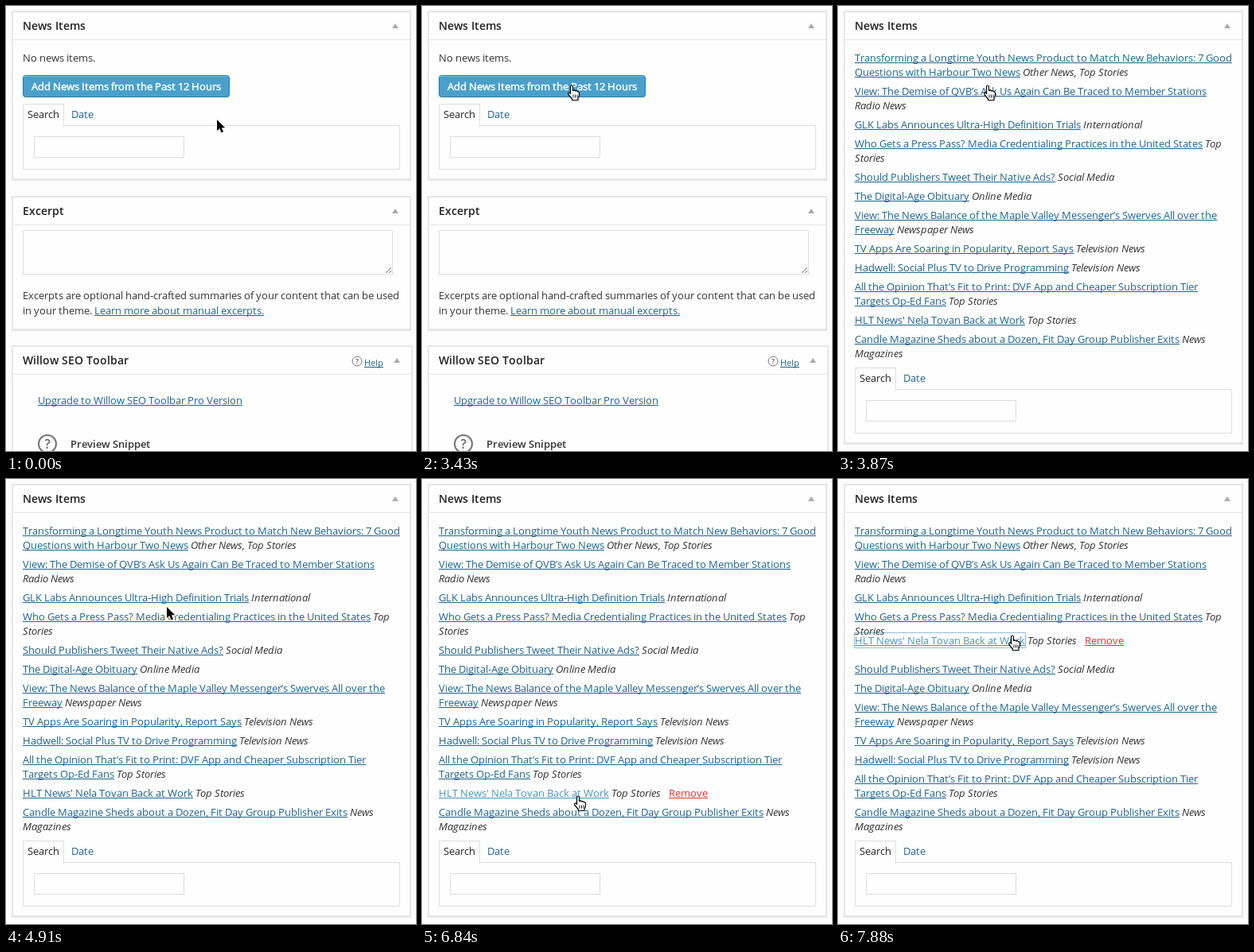
An HTML page for the animation above (8000 ms loop, 515 by 560 pixels).

```html
<!DOCTYPE html>
<html lang="en">
<head>
<meta charset="utf-8">
<title>News Items</title>
<style>
html, body { margin: 0; width: 515px; height: 560px; overflow: hidden; background: #fcfcfc; }
svg { display: block; }
</style>
</head>
<body>
<svg id="stage" width="515" height="560" viewBox="0 0 515 560"></svg>
<script>
const LOOP = 8000, LEFT = 21, ROW = 18, GAP = 6;
const FAMILY = "'Open Sans', sans-serif";
const REGULAR = `13px ${FAMILY}`, ITALIC = `italic 13px ${FAMILY}`;
const TITLE = `600 14px ${FAMILY}`, STRONG = `600 13px ${FAMILY}`, SMALL = `11px ${FAMILY}`;
const INK = '#333', DARK = '#222', BLUE = '#1d6590', HOT = '#4a96bf', RED = '#ea3328', LINE = '#dedede';

// "|" ends the link part, the rest is the category
const items = [
  'Transforming a Longtime Youth News Product to Match New Behaviors: 7 Good\nQuestions with Harbour Two News|Other News, Top Stories',
  'View: The Demise of QVB’s Ask Us Again Can Be Traced to Member Stations|\nRadio News',
  'GLK Labs Announces Ultra-High Definition Trials|International',
  'Who Gets a Press Pass? Media Credentialing Practices in the United States|Top\nStories',
  'Should Publishers Tweet Their Native Ads?|Social Media',
  'The Digital-Age Obituary|Online Media',
  'View: The News Balance of the Maple Valley Messenger’s Swerves All over the\nFreeway|Newspaper News',
  'TV Apps Are Soaring in Popularity, Report Says|Television News',
  'Hadwell: Social Plus TV to Drive Programming|Television News',
  'All the Opinion That’s Fit to Print: DVF App and Cheaper Subscription Tier\nTargets Op-Ed Fans|Top Stories',
  "HLT News' Nela Tovan Back at Work|Top Stories",
  'Candle Magazine Sheds about a Dozen, Fit Day Group Publisher Exits|News\nMagazines'
];
const DRAGGED = 10;

// Pointer moves: first step, last step, number of steps, end point
const start = [265, 143];
const moves = [
  [750, 1640, 7, 187, 99],
  [4760, 5650, 7, 262, 412],
  [5800, 5800, 1, 260, 413],
  [5950, 6240, 3, 254, 420],
  [6690, 6840, 2, 195, 398],
  [6980, 7130, 2, 218, 391],
  [7430, 7880, 4, 218, 196]
];
const HAND_AT = 3430, LIST_AT = 3870, HOVER_AT = 4020, DRAG_AT = 7430;

// Text is set with whole-pixel advances
const pen = document.createElement('canvas').getContext('2d');
const cache = {};
function advance(ch, font) {
  const key = font + ch;
  if (!(key in cache)) {
    pen.font = font;
    cache[key] = Math.round(pen.measureText(ch).width);
  }
  return cache[key];
}
const width = (str, font = REGULAR) => [...str].reduce((w, ch) => w + advance(ch, font), 0);

function text(str, x, y, fill = INK, font = REGULAR, extra = '') {
  const xs = [];
  for (const ch of str) {
    xs.push(x);
    x += advance(ch, font);
  }
  return `<text x="${xs.join(' ')}" y="${y}" fill="${fill}" style="font:${font}" ${extra}>${str}</text>`;
}
const rect = (x, y, w, h, fill, extra = '') =>
  `<rect x="${x}" y="${y}" width="${w}" height="${h}" fill="${fill}" ${extra}/>`;
const frame = (x, y, w, h) => rect(x + .5, y + .5, w - 1, h - 1, '#fefefe', `stroke="${LINE}"`);
const link = (str, x, y, fill = BLUE, font = REGULAR) =>
  text(str, x, y, fill, font) + rect(x, y + 1, width(str, font), 1, fill);
const path = (d, attrs) => `<path d="${d}" ${attrs}/>`;

function panel(title, top, bottom, right) {
  const w = right - 11;
  return rect(7, top, right - 7, bottom - top, '#e7e7e7') +
    rect(9, top + 2, w, bottom - top - 5, '#fefefe') +
    rect(9, top + 36, w, 1, '#e7e7e7') +
    text(title, LEFT, top + 24, DARK, TITLE) +
    path(`M${right - 24} ${top + 22}l4-6 4 6z`, 'fill="#aaa"');
}

const tabs = dy => `<g transform="translate(0 ${dy})">` +
  frame(21, 150, 474, 56) + frame(21, 123, 52, 29) + rect(22, 150, 50, 3, '#fefefe') +
  text('Search', 27, 141, DARK) + text('Date', 82, 141, BLUE) + frame(35, 164, 189, 27) + '</g>';

function question(x, y, r, stroke, size) {
  return `<circle cx="${x}" cy="${y}" r="${r}" fill="none" stroke="#777" stroke-width="${stroke}"/>` +
    `<text x="${x}" y="${y + size * .36}" text-anchor="middle" fill="#666" style="font:600 ${size}px ${FAMILY}">?</text>`;
}

function emptyPage() {
  return panel('News Items', 6, 220, 509) +
    text('No news items.', LEFT, 70) +
    rect(21.5, 87.5, 259, 27, '#4aa0cb', 'rx="3" stroke="#2a7ba4"') +
    rect(23, 88, 256, 1, '#78bbdc') +
    text('Add News Items from the Past 12 Hours', 32, 106, '#fff', REGULAR, 'stroke="#fff" stroke-width=".45"') +
    tabs(0) +
    panel('Excerpt', 239, 409, 509) +
    frame(21, 282, 465, 56) +
    path('M477 336l7-7M481 336l3-3', 'stroke="#777"') +
    text('Excerpts are optional hand-crafted summaries of your content that can be used', LEFT, 369) +
    text('in your theme.', LEFT, 388) +
    link('Learn more about manual excerpts.', LEFT + width('in your theme. '), 388) +
    panel('Willow SEO Toolbar', 427, 575, 511) +
    question(441, 447, 6, 1, 9) +
    link('Help', 450, 453, BLUE, SMALL) +
    link('Upgrade to Willow SEO Toolbar Pro Version', 40, 501) +
    question(52, 551, 11, 2, 16) +
    text('Preview Snippet', 81, 556, INK, STRONG);
}

// Split every item into runs of link and category text
let nextTop = 56;
const layout = items.map(item => {
  const runs = [];
  let isLink = true;
  const lines = item.split('\n');
  lines.forEach((line, row) => {
    let x = LEFT;
    line.split('|').forEach((str, i) => {
      if (i) {
        isLink = false;
        x += advance(' ', REGULAR);
      }
      if (!str) return;
      const w = width(str, isLink ? REGULAR : ITALIC);
      runs.push({ str, x, w, row, isLink });
      x += w;
    });
  });
  const top = nextTop, height = lines.length * ROW;
  nextTop += height + GAP;
  return { runs, top, height };
});

function drawItem({ runs }, top, hover, hot, ring) {
  const last = runs[runs.length - 1];
  let out = runs.map(({ str, x, row, isLink }) => {
    const y = top + row * ROW + 14;
    return isLink ? link(str, x, y, hot ? HOT : BLUE) : text(str, x, y, INK, ITALIC);
  }).join('');
  if (hover) out += link('Remove', last.x + last.w + 10, top + last.row * ROW + 14, RED);
  if (ring) out += rect(20.5, top - .5, runs[0].w + 1, 19, 'none', 'stroke="#2b7aa6" stroke-dasharray="1 1"');
  return out;
}

function pointer(t) {
  let [x, y] = start;
  for (const [from, to, n, endX, endY] of moves) {
    if (t < from) break;
    const done = n > 1 ? Math.floor((t - from) * (n - 1) / (to - from) + .05) + 1 : 1;
    const p = Math.min(1, done / n), ease = p * p * (3 - 2 * p);
    x += (endX - x) * ease;
    y += (endY - y) * ease;
  }
  return [Math.round(x), Math.round(y)];
}

function cursor(x, y, hand) {
  const art = hand
    ? path('M-2 2Q-2 0-.5 0T1 2V6.5Q3.5 5 4 7Q6.5 6 7 8Q9 7.5 9 9.5V12Q9 14 7.5 16V18.5H0V17L-4.5 11.5Q-5.5 9.5-4 9T-2 10.5Z',
      'fill="#fff" stroke="#000" stroke-width="1.2" stroke-linejoin="round" transform="translate(1.5 1)"') +
      path('M3 12.5v4M5.5 12.5v4M8 12.5v4', 'stroke="#000" stroke-width=".9"')
    : path('M0 0V14L3.3 11 5.5 16.3 8 15.2 5.8 10.2H10.2Z', 'fill="#000" stroke="#fff" paint-order="stroke" stroke-width="2"');
  return `<g transform="translate(${x} ${y})">${art}</g>`;
}

function scene(t) {
  const [x, y] = pointer(t);
  if (t < LIST_AT) return emptyPage() + cursor(x, y, t >= HAND_AT);

  const dragging = t >= DRAG_AT, dragTop = y - 2;
  let out = panel('News Items', 6, 552, 509) + tabs(332), anyHot = dragging;
  layout.forEach((item, i) => {
    if (dragging) {
      if (i === DRAGGED) return;
      const pushed = i < DRAGGED && dragTop + ROW / 2 < item.top + item.height / 2;
      out += drawItem(item, item.top + (pushed ? ROW + GAP : 0));
      return;
    }
    const hover = t >= HOVER_AT && y >= item.top && y < item.top + item.height;
    const row = Math.floor((y - item.top) / ROW);
    const hot = hover && item.runs.some(r => r.isLink && r.row === row && x >= r.x && x < r.x + r.w);
    anyHot = anyHot || hot;
    out += drawItem(item, item.top, hover, hot);
  });
  if (dragging) out += drawItem(layout[DRAGGED], dragTop, true, true, true);
  return out + cursor(x, y, t < HOVER_AT || anyHot);
}

const stage = document.getElementById('stage');
const began = performance.now();
let shown = '';
function tick() {
  const next = scene((performance.now() - began) % LOOP);
  if (next !== shown) stage.innerHTML = shown = next;
  requestAnimationFrame(tick);
}
tick();
</script>
</body>
</html>
```
